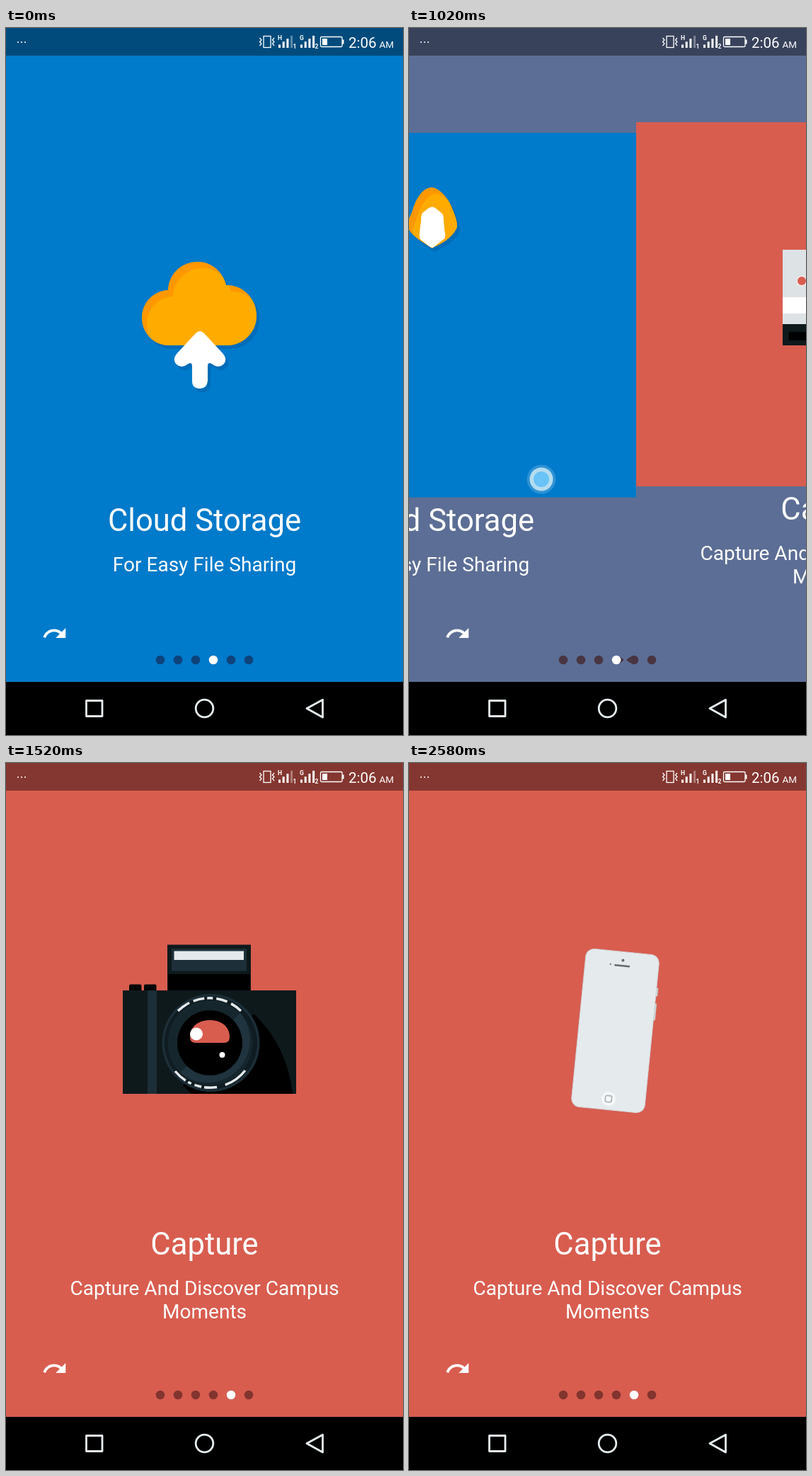
Write an HTML page that moves like this. It is 561 px wide and 998 px high and loops after 2600 ms.

```html
<!DOCTYPE html>
<html lang="en">
<head>
<meta charset="utf-8">
<title>Onboarding pages</title>
<style>
html, body { margin: 0; width: 100%; height: 100%; overflow: hidden; background: #000; }
svg { display: block; width: 100vw; height: 100vh; }
text { font-family: Roboto, sans-serif; fill: #fff; }
.title { font-size: 43.6px; text-anchor: middle; }
.sub { font-size: 28.05px; text-anchor: middle; }
.tiny { font-size: 8.5px; font-weight: 700; }
</style>
</head>
<body>
<svg viewBox="0 0 561 998" preserveAspectRatio="none">
  <defs><clipPath id="cloudClip"><path id="clipShape"/></clipPath></defs>
  <rect id="bg" width="561" height="998"/>

  <g id="page1">
    <rect y="148" width="561" height="514.5" fill="#007aca"/>
    <g id="cloud">
      <path id="cloudShade" fill="#006cb8" transform="translate(4 5)"/>
      <path id="arrowShade" fill="#006cb8" transform="translate(4 5)"/>
      <path id="cloudDark" fill="#ff9800"/>
      <g clip-path="url(#cloudClip)"><path id="cloudLight" fill="#ffab00" transform="translate(7 9)"/></g>
      <path id="arrow" fill="#fff"/>
    </g>
    <text class="title" x="280.5" y="709.5">Cloud Storage</text>
    <text class="sub" x="280.5" y="767">For Easy File Sharing</text>
  </g>

  <g id="page2">
    <rect y="133" width="561" height="514" fill="#d85d4f"/>

    <g id="instant">
      <rect x="259" y="326.5" width="51" height="5" rx="1" fill="#3c3a3e"/>
      <rect x="207" y="330" width="155.5" height="135" fill="#dde2e5"/>
      <rect x="207" y="397" width="155.5" height="23" fill="#fff"/>
      <ellipse cx="300" cy="377" rx="24" ry="24" fill="#c6bfc3"/>
      <path d="M276 385h6.5v50h-6.5z" fill="#d85d4f"/>
      <path d="M282.500 385h6.500v50h-6.500z" fill="#6f9dae"/>
      <path d="M289 385h6.500v50h-6.500z" fill="#e0820f"/>
      <rect x="207" y="435" width="155.5" height="30" fill="#0e191c"/>
      <rect x="215.500" y="446" width="138" height="12" rx="2" fill="#000"/>
      <circle cx="234" cy="374" r="7.500" fill="#f3e9e9"/>
      <circle cx="234" cy="374" r="6" fill="#d85d4f"/>
      <circle cx="286" cy="363.500" r="26.500" fill="#25292d"/>
      <circle cx="286" cy="363.500" r="23.500" fill="#111d22" stroke="#8f9a9f" stroke-width="1.500"/>
      <circle cx="286" cy="363.500" r="14.500" fill="#000"/>
      <path d="M279 362a7 7 0 0 1 14 0q0 2-2 2h-10q-2 0-2-2z" fill="#d85d4f"/>
      <rect x="321.500" y="340.500" width="32" height="19.500" fill="#0b1417"/>
      <rect x="324.500" y="345" width="26" height="7" fill="#1d2f38"/>
    </g>

    <g id="slr">
      <g id="flash">
        <rect x="228" y="256.500" width="118" height="66" fill="#0e191c"/>
        <rect x="229" y="298" width="116" height="25" fill="#000"/>
        <rect x="234" y="262" width="106" height="31.500" fill="#1d2f38"/>
        <rect x="237.500" y="265.500" width="98.500" height="12.500" fill="#e4e9eb"/>
      </g>
      <rect x="174" y="312.500" width="17.500" height="10" rx="2" fill="#030606"/>
      <rect x="195" y="312.500" width="17.500" height="10" rx="2" fill="#030606"/>
      <rect x="165" y="321" width="245" height="146" fill="#0e191c"/>
      <rect x="200" y="321" width="13" height="146" fill="#1c2e37"/>
      <path d="M350 354Q397 398 405 467H262L250 455z" fill="#000"/>
      <circle cx="289.500" cy="395" r="69" fill="#1c2e37"/>
      <circle cx="289.500" cy="395" r="65.500" fill="#0f1c21"/>
      <circle cx="288.500" cy="395" r="60" fill="#16262d"/>
      <path d="M331 353A60 60 0 0 1 246 437z" fill="#20343f"/>
      <circle cx="288" cy="395" r="46" fill="#000"/>
      <path d="M260 387C260 371 273 363 288 363S316 371 316 387Q316 395 308 395H268Q260 395 260 387z" fill="#d85d4f"/>
      <circle cx="269" cy="382.500" r="9" fill="#fff"/>
      <circle cx="305.500" cy="412" r="4" fill="#fff"/>
      <g fill="none" stroke="#e4e9eb" stroke-width="3.500">
        <path d="M243 350A63.500 63.500 0 0 1 332 350" stroke-dasharray="20 6 16 4 8 5 16 6 30"/>
        <path d="M239 435A63.500 63.500 0 0 0 338 434" stroke-dasharray="20 4 5 5 10 4 18 12 40"/>
      </g>
    </g>

    <g id="phone">
      <rect x="51" y="-66" width="3.500" height="12" rx="1" fill="#cdd3d6"/>
      <rect x="51" y="-44" width="3.500" height="24" rx="1" fill="#cdd3d6"/>
      <rect x="-52" y="-112" width="104" height="224" rx="12" fill="#e5eaed" stroke="#cfd4d7"/>
      <rect x="-10.500" y="-93.500" width="22" height="2.500" rx="1" fill="#65696c"/>
      <circle cx="1" cy="-100" r="2" fill="#65696c"/>
      <circle cx="-16" cy="-93" r="1.300" fill="#8d9295"/>
      <circle cx="0" cy="96.500" r="10" fill="#f5f8f9"/>
      <rect x="-4.500" y="92" width="9" height="9" rx="2.500" fill="none" stroke="#b1b6b9" stroke-width="1.800"/>
    </g>

    <text class="title" x="280.5" y="693.5">Capture</text>
    <text class="sub" x="280.5" y="750.5">Capture And Discover Campus</text>
    <text class="sub" x="280.5" y="783.5">Moments</text>
  </g>

  <g id="touch">
    <circle r="20.500" fill="#fff" opacity=".18"/>
    <circle r="16.500" fill="#b5dcf0"/>
    <circle r="11" fill="#69c3f6"/>
  </g>

  <path fill="#fff" transform="translate(50 836) scale(1.558)" d="M18.4 10.6C16.55 8.99 14.15 8 11.500 8c-4.650 0-8.580 3.030-9.960 7.220L3.900 16c1.050-3.190 4.050-5.500 7.600-5.500 1.950 0 3.730.720 5.120 1.880L13 16h9V7z"/>

  <g id="dots"></g>
  <circle id="spot" cy="892" r="6.300" fill="#fff"/>

  <rect id="bar" width="561" height="39"/>
  <g id="status" fill="#fff">
    <circle cx="17" cy="20" r="1"/><circle cx="22" cy="20" r="1"/><circle cx="27" cy="20" r="1"/>
    <g fill="none" stroke="#fff" stroke-width="1.300">
      <rect x="364" y="11.500" width="10" height="16"/>
      <path d="M358.500 14l2.500 3-2.500 2.500 2.500 2.500-2.500 3M379 14l-2.500 3 2.500 2.500-2.500 2.500 2.500 3"/>
      <rect x="444.500" y="12.500" width="30.500" height="14" rx="1.500"/>
    </g>
    <rect x="447" y="15" width="7" height="9"/>
    <rect x="475" y="16.500" width="2.500" height="6"/>
    <text class="tiny" x="384" y="16.500">H</text>
    <text class="tiny" x="405.500" y="28.500">1</text>
    <text class="tiny" x="415" y="16.500">G</text>
    <text class="tiny" x="436.500" y="28.500">2</text>
    <text x="484" y="27.500" font-size="20.500">2:06</text>
    <text x="527.500" y="27.500" font-size="13.500">AM</text>
  </g>

  <rect y="923" width="561" height="75"/>
  <g fill="none" stroke="#e6eef0" stroke-width="2.800" stroke-linejoin="round">
    <rect x="113.500" y="949.500" width="22.500" height="22"/>
    <circle cx="280.500" cy="960.500" r="12.300"/>
    <path d="M425 960.500L447.500 948.200V973z"/>
  </g>
</svg>
<script>
const LOOP = 2600, WIDTH = 561;
const $ = id => document.getElementById(id);
const set = (id, name, value) => $(id).setAttribute(name, value);
const show = (id, on) => set(id, 'display', on ? 'inline' : 'none');
const clamp = (v, lo = 0, hi = 1) => Math.min(hi, Math.max(lo, v));
const lerp = (a, b, u) => a + (b - a) * u;
const span = (t, a, b) => clamp((t - a) / (b - a));
const smooth = u => u * u * (3 - 2 * u);

// Piecewise track of [time, value] pairs.
function track(t, keys) {
  let i = 0;
  while (i < keys.length - 2 && t > keys[i + 1][0]) i++;
  const [a, va] = keys[i], [b, vb] = keys[i + 1];
  return lerp(va, vb, span(t, a, b));
}

function mix(colors, p) {
  const stops = colors.length - 1, i = Math.min(stops - 1, Math.floor(p * stops));
  const u = p * stops - i;
  return 'rgb(' + colors[i].map((c, k) => Math.round(lerp(c, colors[i + 1][k], u))) + ')';
}

function morph(shapes, m) {
  const i = Math.min(shapes.length - 2, Math.floor(m)), u = m - i;
  const next = shapes[i + 1].match(/\d+/g);
  let k = 0;
  return shapes[i].replace(/\d+/g, n => lerp(+n, +next[k++], u).toFixed(2));
}

const CLOUD = [
  'M231 448C209 448 192 431 192 409C192 388 208 371 229 370C230 347 248 330 271 330C290 330 306 343 311 363C335 362 354 382 354 406C354 430 335 448 312 448C290 448 255 448 231 448Z',
  'M237 406C214 406 202 390 202 371C202 350 216 333 237 331C241 310 254 297 271 297C286 297 299 307 304 324C328 324 345 345 345 371C345 391 333 405 308 406C290 406 255 406 237 406Z',
  'M270 309C258 302 238 290 238 278C239 268 244 262 246 254C252 236 262 225 272 225C281 225 294 238 299 250C303 260 308 270 308 280C305 293 285 306 275 309C274 311 272 311 270 309Z'
];
const ARROW = [
  'M268 431Q274 425 280 431L306 459Q314 468 307 475Q300 481 292 475Q285 470 285 478L285 498Q284 509 274 509Q263 509 263 498L263 478Q263 470 256 475Q248 481 241 475Q234 468 242 459Z',
  'M269 376Q274 371 279 376L305 403Q308 407 305 418Q302 429 292 424Q284 421 283 428L283 446Q282 455 274 455Q265 455 265 446L265 428Q264 421 256 424Q246 429 243 418Q240 407 242 403Z',
  'M268 254Q273 251 277 254L286 261Q289 264 289 272Q290 285 291 290Q292 297 288 299L279 306Q275 310 273 310Q270 310 267 307L258 300Q254 297 255 290Q256 280 257 272Q257 264 259 261Z'
];

function drawCloud(t) {
  const m = track(t, [[0, 0], [400, 0], [540, .5], [660, 1], [860, 1.5], [1020, 2]]);
  const shape = morph(CLOUD, m), arrow = morph(ARROW, m);
  for (const id of ['cloudShade', 'cloudDark', 'cloudLight', 'clipShape']) set(id, 'd', shape);
  for (const id of ['arrowShade', 'arrow']) set(id, 'd', arrow);
  const s = .04 * Math.sin(Math.PI * span(t, 0, 480));
  set('cloud', 'transform', `translate(273 448) scale(${1 + s} ${1 - s}) translate(-273 -448)`);
}

function drawCameras(t) {
  const swap = 1280, last = 2060;
  show('instant', t < swap);
  show('slr', t >= swap && t < last);
  show('phone', t >= last);

  const iy = track(t, [[880, -45], [1020, -17], [1100, 0], [1160, 0], [1280, -50]]);
  set('instant', 'transform', `translate(0 ${iy}) rotate(${-8 * span(t, 1160, swap)} 285 397)`);

  const sy = track(t, [[swap, -50], [1400, 0], [1720, 0], [1900, -45], [1980, -92], [last, -72]]);
  const sa = track(t, [[swap, 6], [1400, 0], [1720, 0], [1900, -6.1], [1980, -12], [last, -12]]);
  const sx = -span(t, 1720, 1900);
  set('slr', 'transform', `translate(${sx} ${sy}) rotate(${sa} 289 395)`);
  set('flash', 'transform', `translate(0 ${64 * (1 - smooth(span(t, 1340, 1460)))})`);

  const px = track(t, [[2160, 280], [2400, 291.5]]);
  const py = track(t, [[last, 318], [2140, 378]]);
  const pa = track(t, [[last, -68], [2160, -54], [2400, 0], [2490, 9], [2580, 5.7]]);
  set('phone', 'transform', `translate(${px} ${py}) rotate(${pa})`);
}

function drawDots(t, p) {
  const y = 892, r = 6.3, a = 293, b = 318;
  const joined = p >= .5, back = smooth(span(t, 1180, 1260));
  const dot = (x, s) => `M${x - s} ${y}a${s} ${s} 0 1 0 ${2 * s} 0a${s} ${s} 0 1 0 ${-2 * s} 0z`;
  let d = '';
  for (let i = 0; i < 6; i++) {
    const x = 218 + 25 * i;
    d += dot(x, x === a && back > 0 ? Math.max(.01, r * span(t, 1240, 1320)) : r);
  }
  if (p > 0 && !joined) {
    const reach = 12.5 * p / .5;
    const tip = (x, k) => `M${x} ${y - r}Q${x + 6 * k} ${y - 5} ${x + reach * k} ${y}Q${x + 6 * k} ${y + 5} ${x} ${y + r}z`;
    d += tip(a, 1) + tip(b, -1);
  } else if (joined && back < 1) {
    const h = r * clamp((p - .4) / .4), left = lerp(a, b, back);
    d += `M${left} ${y - h}H${b}V${y + h}H${left}z` + dot(left, r);
  }
  $('dots').innerHTML = `<path d="${d}" fill="${mix([[13, 67, 122], [83, 51, 57], [130, 52, 46]], p)}"/>`;
  set('spot', 'cx', lerp(a, b, smooth(span(t, 1056, 1186))));
}

function drawBars(p) {
  const fill = [11, 22, 33, 44];
  let out = '';
  [385, 416].forEach((x, n) => fill.forEach((v, i) => {
    const h = 4.5 + i * 4.2;
    out += `<rect x="${x + i * 5.7}" y="${28 - h}" width="3" height="${h}" opacity="${n === 0 && i === 3 ? .35 : 1}"/>`;
  }));
  const g = document.createElementNS('http://www.w3.org/2000/svg', 'g');
  g.innerHTML = out;
  $('status').append(g);
}

function draw(t) {
  const off = track(t, [[860, 0], [940, 85], [1020, 240], [1060, 420], [1100, 536], [1140, 555], [1180, WIDTH]]);
  const p = off / WIDTH;
  set('bg', 'fill', mix([[0, 122, 202], [216, 93, 79]], p));
  set('bar', 'fill', mix([[0, 75, 124], [132, 55, 48]], p));
  set('page1', 'transform', `translate(${-off} 0)`);
  set('page2', 'transform', `translate(${WIDTH - off} 0)`);
  show('page1', off < WIDTH);
  show('page2', off > 0);
  set('touch', 'transform', `translate(${427 - Math.min(off, 330)} 637)`);
  set('touch', 'opacity', span(t, 820, 860) * (1 - span(t, 1040, 1080)));
  drawCloud(t);
  drawCameras(t);
  drawDots(t, p);
}

drawBars();
const start = performance.now();
function tick() {
  const t = (performance.now() - start) % LOOP;
  draw(Math.floor(t / 20) * 20);
  requestAnimationFrame(tick);
}
tick();
</script>
</body>
</html>
```
